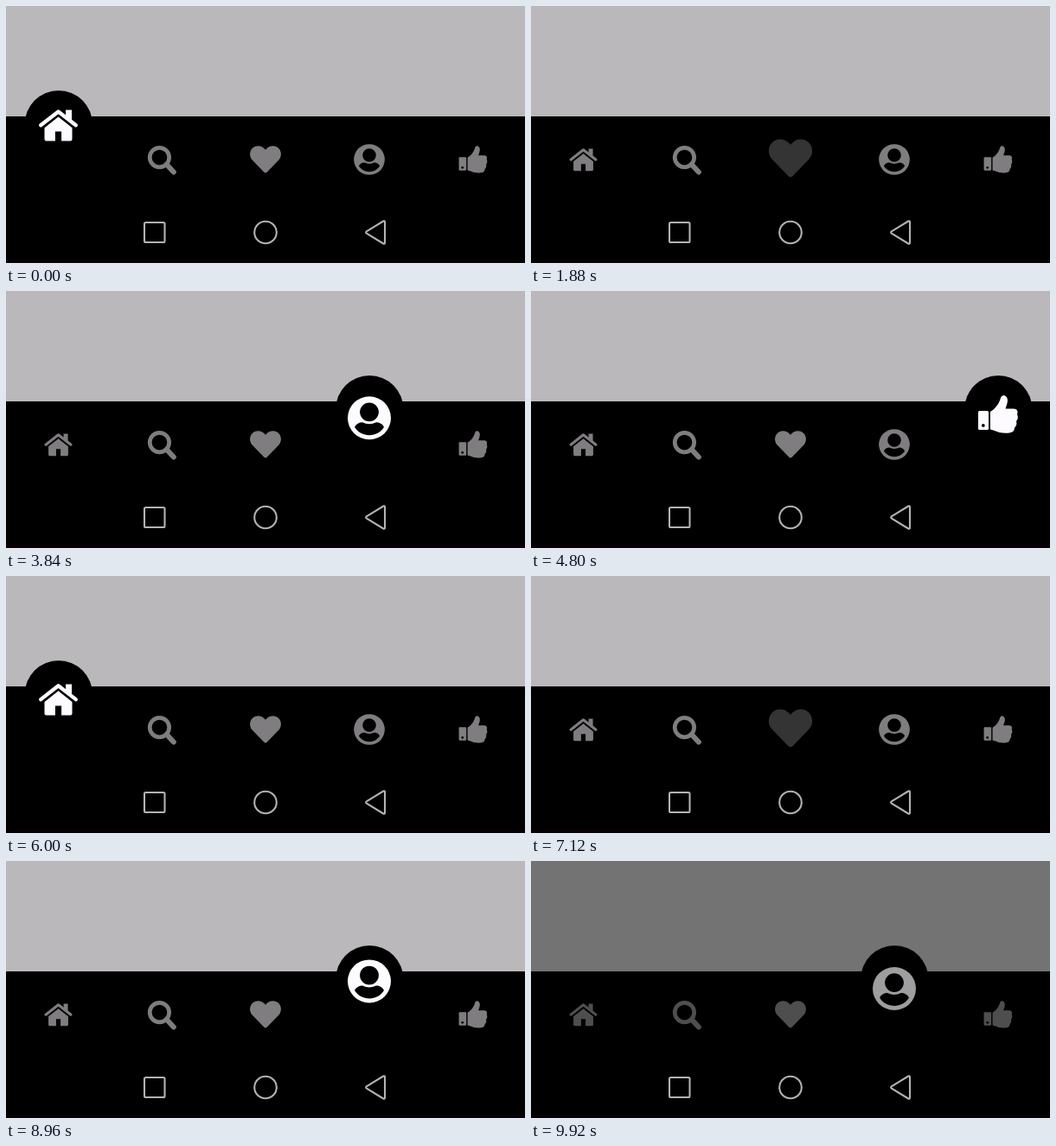
Animation, 600 px wide and 298 px high, one loop 10000 ms. Source, as an HTML page:

```html
<!DOCTYPE html>
<html lang="en">
<head>
<meta charset="utf-8">
<title>Bottom navigation</title>
<style>
  html, body { margin: 0; width: 100%; height: 100%; overflow: hidden; background: #000; }
  svg { display: block; width: 600px; height: 298px; }
</style>
</head>
<body>
<svg viewBox="0 0 600 298" xmlns="http://www.w3.org/2000/svg">
  <defs>
    <g id="home">
      <path d="M-20.3 .2L0-15.6 20.3 .2" fill="none" stroke="currentColor" stroke-width="4.4" stroke-linecap="round" stroke-linejoin="round"/>
      <path d="M8.5-17.5H15.5V-3.5L8.5-9Z"/>
      <path d="M-16 3.2L0-9.6 16 3.2V16.5Q16 18.5 14 18.5H3.6V7.5H-3.6V18.5H-14Q-16 18.5-16 16.5Z"/>
    </g>
    <g id="search" fill="none" stroke="currentColor">
      <circle cx="-3.6" cy="-3.4" r="15.7" stroke-width="6.6"/>
      <path d="M8 8L19.3 20.3" stroke-width="8.4" stroke-linecap="round"/>
    </g>
    <path id="heart" transform="scale(.0982) translate(-256 -258)" d="M462 63C407 16 326 24 276 76L256 96 236 76C186 24 104 16 50 63C-13 116-16 212 40 270L233 470C246 483 266 483 279 470L472 270C528 212 525 116 462 63Z"/>
    <path id="user" fill-rule="evenodd" d="M0-25A25 25 0 0 1 0 25A25 25 0 0 1 0-25ZM0-17.8A10.9 10.9 0 0 0 0 4A10.9 10.9 0 0 0 0-17.8ZM-17 10.5A20 20 0 0 0 17 10.5Q14 5 8 5Q0 9-8 5Q-14 5-17 10.5Z"/>
    <g id="thumb">
      <rect x="-23" y="-4" width="12" height="22" rx="1.5"/>
      <circle cx="-17.2" cy="13" r="1.9" fill="#000"/>
      <path d="M-9-3C-4-6 0-11 2-16C3-20 4-22 6.5-22C11-21.5 12-16 10-11L8.5-6.5H18C22-6.5 23.5-3 22 0C23.5 3 23 6 21 8C22 11 21 14 19 15.5C19 19 17 21 13 21.5C6 22.5 0 21-4 19L-9 17.5Z"/>
    </g>
  </defs>
  <rect width="600" height="298"/>
  <rect width="600" height="128" fill="#bab8ba"/>
  <circle id="bubble" r="39.2"/>
  <g id="small" color="#7f7d7f" fill="#7f7d7f"></g>
  <g id="big" color="#fdfbff" fill="#fdfbff"></g>
  <rect id="dim" width="600" height="225"/>
  <g fill="none" stroke="#b4b2b4" stroke-width="2.1" stroke-linejoin="round">
    <rect x="160" y="251" width="23.5" height="23" rx="1.5"/>
    <circle cx="300" cy="262.5" r="12.8"/>
    <path d="M436.2 249.5Q438 248.6 438 250.6V274.4Q438 276.4 436.2 275.5L416.8 263.6Q415.4 262.5 416.8 261.4Z"/>
  </g>
  <rect y="294" width="600" height="4" fill="#080004"/>
</svg>
<script>
  const LOOP = 10000;
  const ICONS = [["home", 60.5], ["search", 180], ["heart", 300], ["user", 420], ["thumb", 540]];
  const TAPS = [220, 1660, 2900, 4340, 5540, 6900, 8300];
  const ORDER = [0, 1, 2, 3, 4, 0, 2, 3];
  const ROW_Y = 178, LIFT = 30, FIRST_LIFT = 40, SMALL = 1 / 1.4;
  const SWITCH = 200, RISE = 215, RISE_TIME = 800;

  const el = id => document.getElementById(id);
  const clamp = v => Math.min(1, Math.max(0, v));
  const easeOut = v => 1 - (1 - v) ** 3;
  const overshoot = (v, s = 3.4) => 1 + (v - 1) ** 2 * ((s + 1) * (v - 1) + s);

  function addIcons(parent) {
    return ICONS.map(([name]) => {
      const g = document.createElementNS("http://www.w3.org/2000/svg", "g");
      g.innerHTML = `<use href="#${name}"/>`;
      parent.appendChild(g);
      return g;
    });
  }

  const small = addIcons(el("small"));
  const big = addIcons(el("big"));
  small.forEach((g, i) => g.setAttribute("transform", `translate(${ICONS[i][1]} ${ROW_Y}) scale(${SMALL})`));

  function pose(t) {
    const k = TAPS.filter(tap => tap <= t).length - 1;
    const idle = { active: ORDER[Math.max(k, 0)], lift: k < 1 ? FIRST_LIFT : LIFT, alpha: 1, rise: 1, fading: -1, fade: 1 };
    if (k < 0) return idle;
    const p = t - TAPS[k], next = ORDER[k + 1];
    if (p < SWITCH) return { ...idle, fading: next, fade: 1 - p / 220 };
    return {
      active: next,
      lift: LIFT * overshoot(clamp((p - RISE) / RISE_TIME)),
      alpha: clamp((p - 190) / 150),
      rise: easeOut(clamp((p - RISE) / 200)),
      fading: -1, fade: 1
    };
  }

  function draw(t) {
    const s = pose(t);
    const x = ICONS[s.active][1];
    small.forEach((g, i) => g.setAttribute("opacity", i === s.active ? 0 : i === s.fading ? s.fade : 1));
    big.forEach((g, i) => g.setAttribute("opacity", i === s.active ? s.alpha : 0));
    big[s.active].setAttribute("transform", `translate(${x} ${ROW_Y - s.lift})`);
    el("bubble").setAttribute("cx", x + .3);
    el("bubble").setAttribute("cy", ROW_Y - 40.7 * s.rise);
    el("dim").setAttribute("opacity", .375 * clamp((t - 9460) / 300));
  }

  const start = performance.now();
  function tick() {
    draw((performance.now() - start) % LOOP);
    requestAnimationFrame(tick);
  }
  tick();
</script>
</body>
</html>
```
